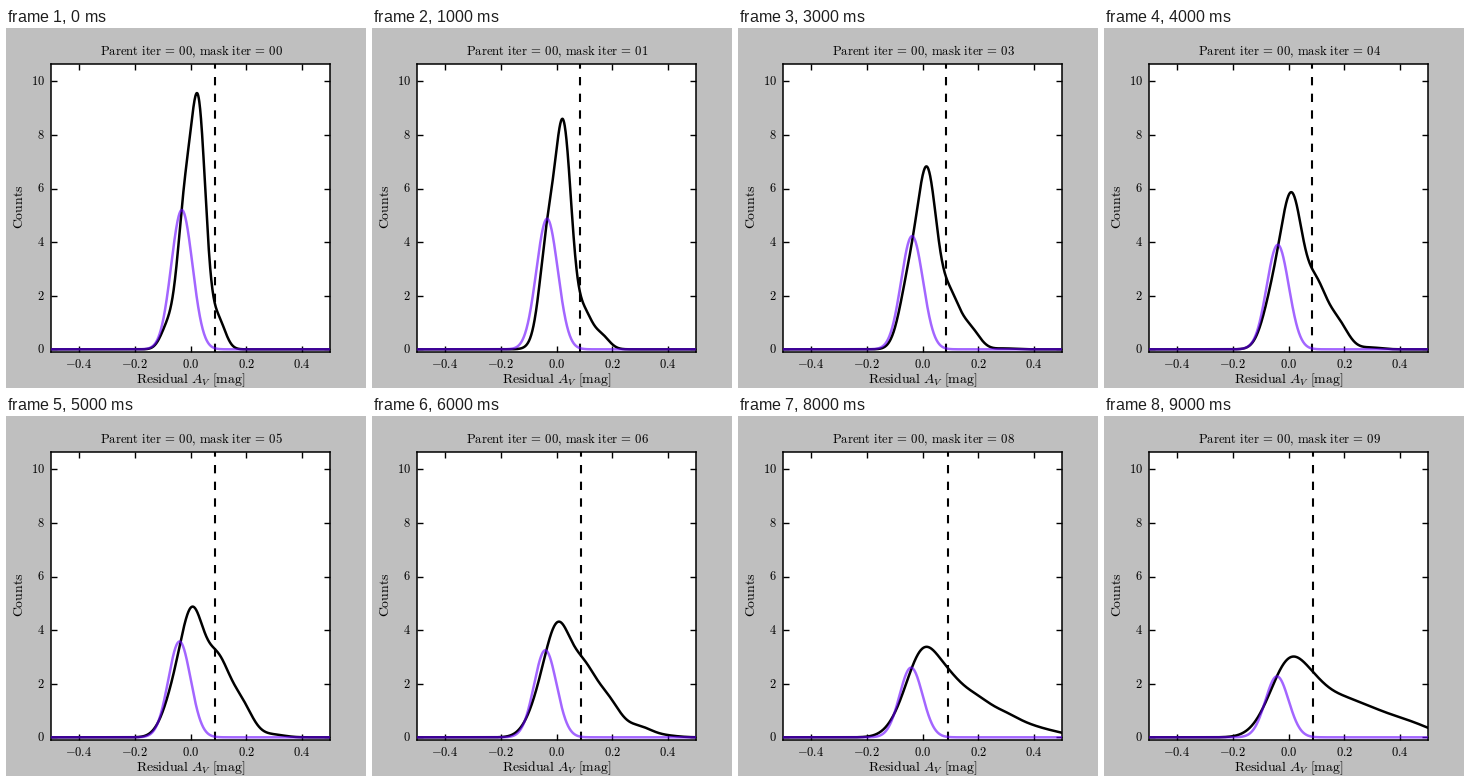
A matplotlib script that plays this animation: 360x360 px, repeating every 10 s.

```python
import math
import numpy as np
import matplotlib.pyplot as plt
from matplotlib.animation import FuncAnimation

SIZE, DPI = 360, 100
KEYS = [0, 2, 5, 7, 9]
plt.rcParams["mathtext.fontset"] = "cm"

x = np.linspace(-0.5, 0.5, 1000)


def at(i, *values):
    return np.interp(i, KEYS, values)


def bump(centre, width, height):
    return height * np.exp(-0.5 * ((x - centre) / width) ** 2)


def density_curve(i):
    """A sinking core that feeds a chain of bumps spreading to the right."""
    width = 0.026 * 1.097 ** i
    parts = [
        (at(i, .029, .022, .008, .006, .005), at(i, 8.6, 7.3, 4.3, 3.05, 2.25)),
        (at(i, -.021, -.042, -.06, -.06, -.06), at(i, 4.9, 2.9, 1.3, .75, .55)),
        (-.08, 0.85 * 0.1 ** i),
        (.098, at(i, 1.1, 1.5, 2.6, 1.85, 1.4)),
        (.155 + .005 * i, min(i, 1) * at(i, .5, .5, 1.2, 1.25, 1)),
        (.295, at(i, 0, 0, .1, .65, .72)),
        (.39, at(i, 0, 0, 0, .12, .48)),
        (.48, at(i, 0, 0, 0, 0, .28)),
    ]
    return sum(bump(c, width, h) for c, h in parts)


def fit_curve(i):
    return bump(-0.042 + 0.011 * 0.75 ** i, 0.038 + 0.0004 * i,
                5.2 - 0.325 * i)


def limit_at(i):
    return 0.0875 - 0.0035 * math.sin(2 * math.pi * i / 10)


fig = plt.figure(figsize=(SIZE / DPI, SIZE / DPI), dpi=DPI, facecolor="0.75")
ax = fig.add_axes([0.125, 0.1, 0.775, 0.8])
ax.set_xlim(-0.5, 0.5)
ax.set_ylim(-0.1, 10.646)
ax.set_xticks([-0.4, -0.2, 0, 0.2, 0.4])
ax.set_yticks(range(0, 11, 2))
ax.tick_params(direction="in", length=4, width=1, top=True, right=True,
               labelbottom=False, labelleft=False)
for spine in ax.spines.values():
    spine.set_linewidth(1.1)


def put(px, py, text, size, ha="center", va="baseline", **kw):
    return fig.text(px / SIZE, 1 - py / SIZE, text, fontsize=size, ha=ha,
                    va=va, **kw)


def roman(text):
    return r"\mathrm{%s}" % text.replace(" ", r"\ ")


for v in ax.get_xticks():
    put(184.5 + 279 * v, 339.5, f"${v:.1f}$", 9)
for v in ax.get_yticks():
    put(38.7, 325.3 - 26.8 * v, f"${v:.0f}$", 9, ha="right")

title = put(185.4, 27.6, "", 9.2)
put(184.8, 354.8, "$" + roman("Residual ") + "A_V" + roman(" [mag]") + "$", 9.9)
put(20, 179.3, "$" + roman("Counts") + "$", 9.9, ha="right", va="center",
    rotation=90)

density, = ax.plot(x, 0 * x, color="black", lw=1.8, zorder=3)
fit, = ax.plot(x, 0 * x, color="#6600ff", alpha=0.6, lw=1.8, zorder=4)
limit = ax.axvline(0, color="black", lw=1.5, ls=(0, (4, 4)), zorder=2)


def update(i):
    density.set_ydata(density_curve(i))
    fit.set_ydata(fit_curve(i))
    limit.set_xdata([limit_at(i)] * 2)
    parent = roman("Parent iter") + r"\,=\," + roman("00")
    mask = roman("mask iter") + r"\,=\," + roman(f"{i:02d}")
    title.set_text(f"${parent},\\,{mask}$")
    return density, fit, limit, title


anim = FuncAnimation(fig, update, frames=10, interval=1000, repeat=True,
                     repeat_delay=0, blit=False)
plt.show()
```
